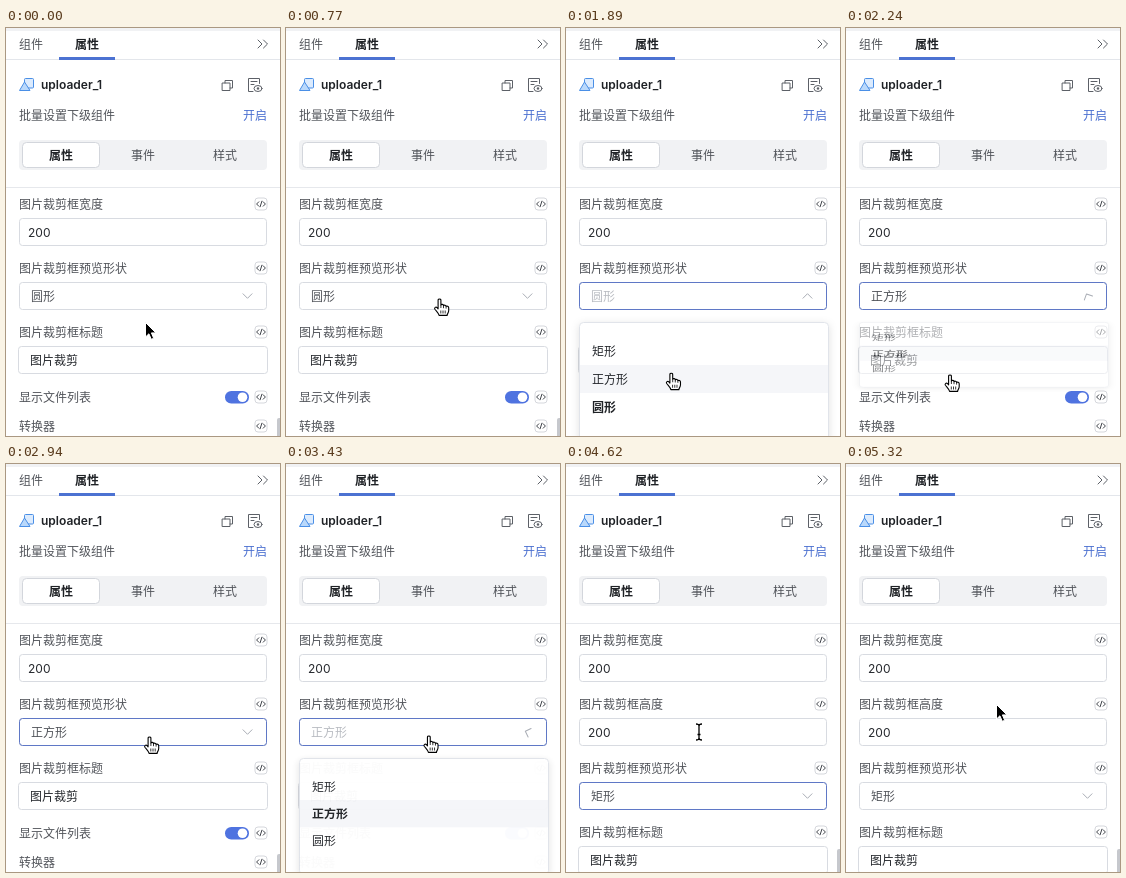
An HTML page for the animation above (5530 ms loop, 274 by 408 pixels).

```html
<!DOCTYPE html>
<html lang="zh-CN">
<head>
<meta charset="utf-8">
<title>属性面板</title>
<style>
  html, body { margin: 0; width: 100%; height: 100%; overflow: hidden; background: #fff; }
  svg { display: block; width: 274px; height: 408px; }
  text { font: 12px Inter, "Noto Sans CJK SC", "Noto Sans CJK", sans-serif; fill: #51545a; }
  .bold { font-weight: 600; fill: #1f2226; }
  .dark { fill: #25282d; }
  .mid { text-anchor: middle; }
  .box { fill: #fff; stroke: #d8dbe1; }
  .line { fill: none; stroke: #5c6067; stroke-linecap: round; stroke-linejoin: round; }
  #panel { filter: drop-shadow(0 2px 4px rgba(0, 0, 0, .12)); }
</style>
</head>
<body>
<svg viewBox="0 0 274 408">
  <defs>
    <g id="code">
      <rect x="-6" y="-6" width="12" height="12" rx="3" fill="#fff" stroke="#d5d7dc"/>
      <path class="line" d="M-2.2-2.2-4.4 0-2.2 2.2M2.2-2.2 4.4 0 2.2 2.2M.9-2.8-.9 2.8" style="stroke:#3f434a"/>
    </g>
    <rect id="field" x="13.5" y="0.5" width="247" height="27" rx="3"/>
  </defs>

  <rect width="274" height="408" fill="#fff"/>
  <rect width="274" height="3" fill="#f1f2f4"/>

  <!-- tabs -->
  <text x="13" y="20.5">组件</text>
  <text x="69" y="20.5" class="bold">属性</text>
  <rect y="31" width="274" height="1" fill="#e3e6eb"/>
  <rect x="53" y="29" width="56" height="3" fill="#4c72d2"/>
  <path class="line" d="M252 12l4 4-4 4M257.500 12l4 4-4 4"/>

  <!-- component header -->
  <rect x="18.500" y="50.500" width="9" height="9.500" rx="1" fill="#dcebfd" stroke="#4a8fe6"/>
  <path d="M18.500 54 24 62.500H13.500Z" fill="#b9d8fb" stroke="#4a8fe6" stroke-linejoin="round"/>
  <text x="35" y="61" class="bold">uploader_1</text>
  <path class="line" d="M216.500 55h7.500v7.500h-7.500ZM219 55v-2.500h7.500v7.500H224"/>
  <path class="line" d="M247 63.500h-4.500v-13h11v5M245 53.500h6M245 56.500h3"/>
  <ellipse class="line" cx="252" cy="60.500" rx="4" ry="3"/>
  <circle cx="252" cy="60.500" r="1.200" fill="#5c6067"/>
  <text x="13" y="91.500">批量设置下级组件</text>
  <text x="237" y="91.500" style="fill:#4a6fd0">开启</text>

  <!-- segments -->
  <rect x="13" y="112" width="248" height="30" rx="4" fill="#f1f2f4"/>
  <rect x="16.500" y="114.500" width="77" height="25" rx="4" fill="#fff" stroke="#d3d6dc"/>
  <text x="55" y="131.500" class="bold mid">属性</text>
  <text x="137" y="131.500" class="mid">事件</text>
  <text x="219" y="131.500" class="mid">样式</text>
  <rect y="159" width="274" height="1" fill="#e6e8ec"/>

  <!-- form -->
  <text x="13" y="180.500">图片裁剪框宽度</text>
  <use href="#code" x="255" y="176"/>
  <use href="#field" y="190" class="box"/>
  <text x="22" y="208.500" class="dark">200</text>

  <g id="height">
    <text x="13" y="244.500">图片裁剪框高度</text>
    <use href="#code" x="255" y="240"/>
    <use href="#field" y="254" class="box"/>
    <text x="22" y="272.500" class="dark">200</text>
  </g>

  <g id="rest">
    <text x="13" y="244.500">图片裁剪框预览形状</text>
    <use href="#code" x="255" y="240"/>
    <use href="#field" y="254" class="box"/>
    <use href="#field" y="254" id="focus" fill="none" stroke="#5f78c6"/>
    <text x="25" y="272.500" id="value"></text>
    <path id="chevron" d="M-4.500-2.200 0 2.300 4.500-2.200" class="line" style="stroke:#a9adb5"/>
    <text x="13" y="308.500">图片裁剪框标题</text>
    <use href="#code" x="255" y="304"/>
    <rect x="12.500" y="318.500" width="249" height="27" rx="3" class="box"/>
    <text x="24" y="336.500" class="dark">图片裁剪</text>
    <text x="13" y="373.500">显示文件列表</text>
    <rect x="219" y="363" width="24" height="12.500" rx="6.250" fill="#4f73e0"/>
    <circle cx="236.500" cy="369.250" r="4.800" fill="#fff"/>
    <use href="#code" x="255" y="369"/>
    <text x="13" y="402.500">转换器</text>
    <use href="#code" x="255" y="398"/>
  </g>

  <rect id="thumb" x="271" width="6" height="40" rx="2" fill="#c6c8cd"/>

  <!-- dropdown -->
  <g id="drop">
    <rect id="panel" x="13.500" y="0.500" width="249" height="119" rx="4" fill="#fff" stroke="#e1e4ea"/>
    <rect id="hover" x="14" width="248" height="28" fill="#f5f6f9"/>
    <g id="items">
      <text x="26" y="33.500">矩形</text>
      <text x="26" y="61.500">正方形</text>
      <text x="26" y="89.500">圆形</text>
    </g>
  </g>

  <!-- pointer -->
  <circle id="ring" fill="none" stroke="#111" stroke-width="1.500"/>
  <g id="pointer">
    <path id="arrow" d="M0 0V14.500L3.400 11.300 5.800 16.800 8.200 15.800 5.900 10.400H10.400Z" fill="#000" stroke="#fff"/>
    <g id="hand" stroke="#000" stroke-width="1.100" stroke-linejoin="round">
      <path fill="#fff" d="M-1.400 8.500V1.200C-1.400-.5 1.400-.5 1.400 1.200V6C1.800 5 4 5.200 4 6.600 4.600 5.800 6.600 6 6.600 7.400 7.400 6.800 9.200 7.200 9.200 8.800V11.500C9.200 14 7.600 14.600 7.600 16.400H-.4C-.6 14.600-3 12.400-4.600 10.200-5.600 8.600-3.600 7.400-2.400 8.600L-1.400 9.800Z"/>
      <path d="M1.400 6v3M4 6.800v2.400M6.600 7.600v2M1.300 11.500v3M3.500 11.500v3M5.700 11.500v3" stroke-width=".8"/>
    </g>
    <path id="beam" d="M-3-8Q0-8 0-6Q0-8 3-8M0-6V6M-3 8Q0 8 0 6Q0 8 3 8M-1.500 2.500h3" fill="none" stroke="#000" stroke-width="1.300"/>
  </g>
</svg>

<script>
const LOOP = 5530, STEP = 70, FADE = 300;
const $ = id => document.getElementById(id);
const clamp = x => Math.max(0, Math.min(1, x));
const smooth = x => x * x * (3 - 2 * x);

// [time, x, y]
const path = [
  [0, 139.5, 294.5], [140, 139.5, 294.5], [350, 246, 262], [560, 153.5, 271],
  [980, 153.5, 271], [1400, 134, 306.5], [1960, 104, 347], [2240, 104, 347],
  [2730, 141, 284], [2940, 143.5, 273], [3080, 144, 270], [3360, 144, 270],
  [3920, 117, 317], [4270, 117, 317], [4620, 133, 268], [4970, 150.5, 240.5], [LOOP, 150.5, 240.5]
];

// [from time, value]
const shapes = [
  [0, 'arrow'], [280, 'hand'], [1190, 'arrow'], [1540, 'hand'], [2450, 'beam'],
  [2520, 'arrow'], [2730, 'hand'], [3500, 'arrow'], [3780, 'hand'],
  [4410, 'arrow'], [4480, 'beam'], [4830, 'arrow']
];
const choices = [[0, 2], [2198, 1], [4158, 0]];
const hovers = [[0, 2], [1680, 1], [3780, 0]];
// [from, to, radius]
const clicks = [[700, 770, 31], [2030, 2100, 31], [3080, 3150, 31], [3990, 4060, 31], [5040, 5180, 22.5]];
const opens = [[868, 2198], [3248, 4158]];
const locks = [[1540, 2380], [3430, 4480]];

const at = (list, t) => list.filter(e => e[0] <= t).pop()[1];
const within = (list, t) => list.find(([a, b]) => t >= a && t < b);

function place(t) {
  const i = path.findIndex(p => p[0] > t);
  const [t0, x0, y0] = path[i - 1], [t1, x1, y1] = path[i];
  const k = smooth((t - t0) / (t1 - t0));
  return [x0 + (x1 - x0) * k, y0 + (y1 - y0) * k];
}

// ease(progress) rises while opening and falls while closing
function openness(t, ease) {
  return Math.max(...opens.map(([a, b]) =>
    t < b ? ease(clamp((t - a) / FADE)) : 1 - ease(clamp((t - b) / FADE))));
}

function draw(t) {
  const [x, y] = place(t);
  const choice = at(choices, t);
  const open = openness(t, k => 1 - (1 - k) ** 4);
  const turn = openness(t, k => k);
  const isOpen = within(opens, t);
  const tall = choice === 0;
  const rows = [...$('items').children];

  $('height').style.display = tall ? '' : 'none';
  $('rest').setAttribute('transform', `translate(0 ${tall ? 64 : 0})`);
  $('value').textContent = rows[choice].textContent;
  $('value').style.fill = isOpen ? '#b9bcc2' : '';
  $('focus').style.opacity = Math.min(clamp((t - 840) / 140), 1 - clamp((t - 5110) / 210));
  $('chevron').setAttribute('transform', `translate(241.5 268) rotate(${180 * turn})`);

  $('thumb').style.display = within(locks, t) ? 'none' : '';
  $('thumb').setAttribute('y', tall ? 385 : 390);

  $('drop').setAttribute('transform', `translate(0 294) scale(1 ${open})`);
  $('drop').style.opacity = open;
  $('drop').style.display = open > 0.01 ? '' : 'none';
  $('hover').setAttribute('y', 15 + 28 * (t > 2800 && t < 3780 ? 1 : at(hovers, t)));
  rows.forEach((row, i) => row.setAttribute('class', i === choice ? 'bold' : 'dark'));

  const click = within(clicks, t);
  $('ring').setAttribute('r', click ? click[2] : 0);
  $('ring').style.display = click ? '' : 'none';
  $('ring').setAttribute('cx', x);
  $('ring').setAttribute('cy', y);

  const shape = at(shapes, t);
  for (const id of ['arrow', 'hand', 'beam']) $(id).style.display = id === shape ? '' : 'none';
  $('pointer').setAttribute('transform', `translate(${x} ${y})`);
}

const start = performance.now();
function tick() {
  const t = (performance.now() - start) % LOOP;
  draw(Math.floor(t / STEP) * STEP);
  requestAnimationFrame(tick);
}
tick();
</script>
</body>
</html>
```
